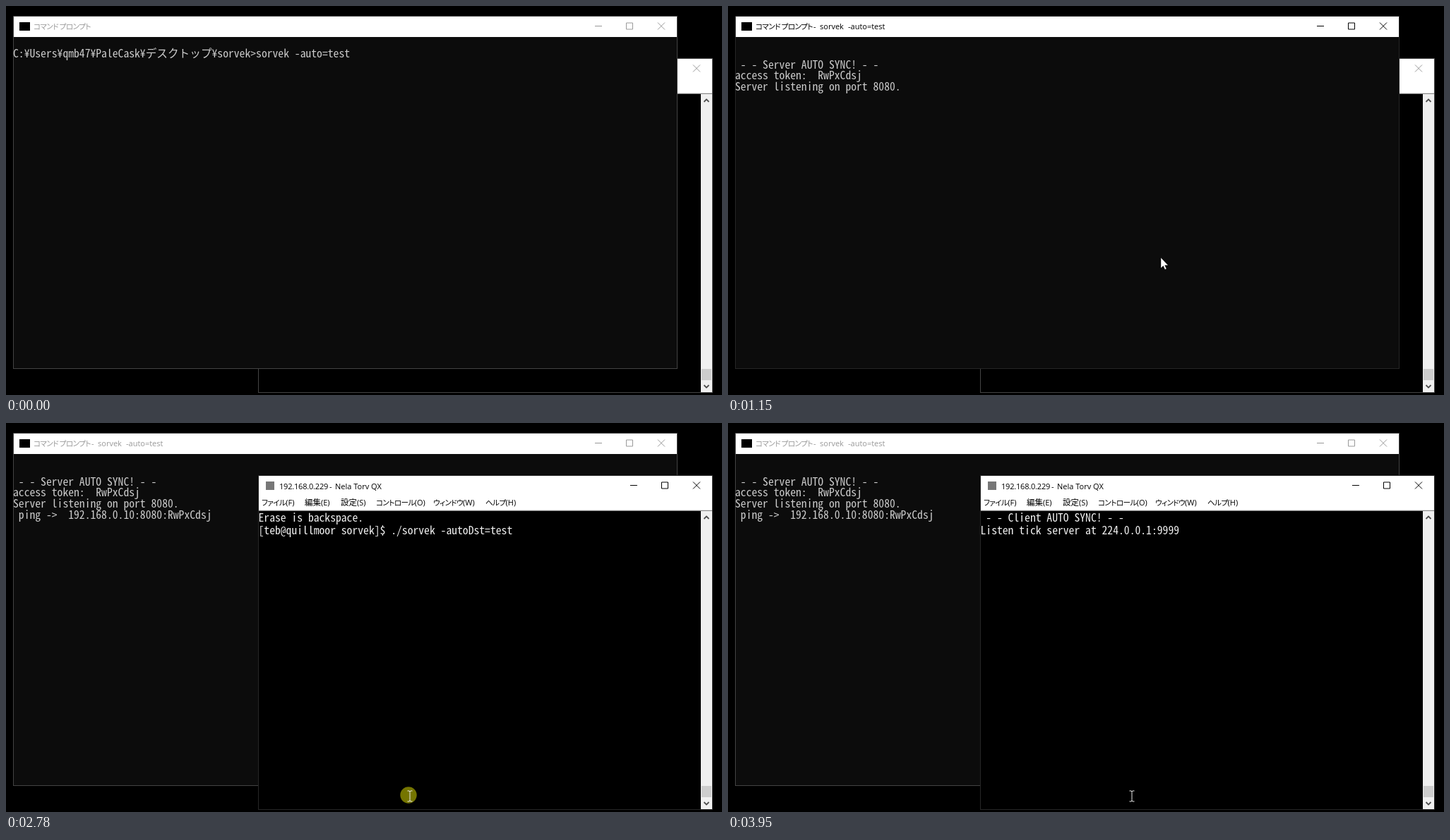
Animation of 1014 by 552 pixels, one loop 8 s. Source, as an HTML page:

```html
<!DOCTYPE html>
<html lang="ja">
<head>
<meta charset="utf-8">
<title>Terminal sync</title>
<style>
html, body { margin: 0; width: 100%; height: 100%; overflow: hidden; background: #000; }
svg { display: block; width: 1014px; height: 552px; }
text { white-space: pre; }
.term { font: 15.64px 'Noto Sans Mono CJK JP', 'Noto Sans CJK JP', 'Noto Sans Mono', monospace; font-kerning: none; }
.ui { font: 11px 'Open Sans', 'Noto Sans', 'Noto Sans CJK JP', sans-serif; }
.ip { letter-spacing: -.2px; }
.kana { font: 10.6px 'Noto Sans CJK JP', 'Noto Sans CJK', sans-serif; font-feature-settings: 'palt'; letter-spacing: -.6px; }
.kanji { font: 11.5px 'Noto Sans CJK JP', 'Noto Sans CJK', sans-serif; }
</style>
</head>
<body>
<svg id="stage" viewBox="0 0 1014 552" xmlns="http://www.w3.org/2000/svg"></svg>
<script>
const LOOP = 8000, CELL = 7.82;
const stage = document.getElementById('stage');

function el(parent, name, attrs = {}, text) {
  const node = document.createElementNS('http://www.w3.org/2000/svg', name);
  for (const key in attrs) node.setAttribute(key, attrs[key]);
  if (text) node.textContent = text;
  parent.appendChild(node);
  return node;
}

const rect = (parent, x, y, width, height, fill) =>
  el(parent, 'rect', { x, y, width, height, fill });

const show = (node, on) => node.setAttribute('visibility', on ? 'inherit' : 'hidden');

const label = (parent, x, y, text, cls = 'ui') =>
  el(parent, 'text', { x, y, class: cls }, text);

// Terminal text sits on a cell grid; Japanese characters take two cells.
function termLine(parent, x, y, text) {
  let col = 0;
  const xs = [...text].map(ch => {
    const at = x + col * CELL;
    col += ch > '\u3000' ? 2 : 1;
    return at.toFixed(2);
  });
  return el(parent, 'text', { x: xs.join(' '), y, class: 'term' }, text);
}

function makeWindow(x, y, w, h, headH, body) {
  const g = el(stage, 'g');
  rect(g, x, y, w, h, body);
  const border = el(g, 'rect', { x: x + .5, y: y + .5, width: w - 1, height: h - 1, fill: 'none' });
  rect(g, x + 1, y + 1, w - 2, headH, '#fff');
  const title = el(g, 'g');
  const right = x + w, mid = y + 14.5;
  el(g, 'path', {
    d: `M${right - 117} ${mid}h10M${right - 72.5} ${mid - 4.5}h9v9h-9z` +
       `M${right - 28} ${mid - 5}l10 10m0 -10l-10 10`,
    fill: 'none', class: 'buttons'
  });
  const buttons = g.lastChild;
  return {
    g, title,
    setActive(on) {
      title.setAttribute('fill', on ? '#000' : '#999');
      buttons.setAttribute('stroke', on ? '#000' : '#999');
      border.setAttribute('stroke', on ? '#262626' : '#444');
    }
  };
}

// Remote terminal
const remote = makeWindow(357, 74, 644, 475, 49, '#000');
rect(remote.g, 358, 123, 642, 1, '#e3e3e3');
rect(remote.g, 358, 124, 642, 1, '#8a8a8a');
rect(remote.g, 984, 125, 16, 423, '#f0f0f0');
rect(remote.g, 985, 515, 14, 16, '#cdcdcd');
el(remote.g, 'path', {
  d: 'M988.5 136l3.5 -3.5l3.5 3.5M988.5 538l3.5 3.5l3.5 -3.5',
  fill: 'none', stroke: '#505050', 'stroke-width': 1.8
});
rect(remote.g, 368, 83, 12, 12, '#777');
label(remote.title, 387, 94, '192.168.0.229', 'ui ip');
label(remote.title, 458, 94, '-');
label(remote.title, 466, 94, 'Nela Torv QX');
const menu = el(remote.g, 'g', { fill: '#000' });
[[362, 'ファイル', 'F'], [423, '編集', 'E'], [474, '設定', 'S'],
 [524, 'コントロール', 'O'], [605, 'ウィンドウ', 'W'], [679, 'ヘルプ', 'H']
].forEach(([x, word, key]) => {
  const item = label(menu, x, 117, '');
  el(item, 'tspan', { class: word > '一' ? 'kanji' : 'kana' }, word);
  el(item, 'tspan', {}, `(${key})`);
});

function remoteScreen(...lines) {
  const g = el(remote.g, 'g', { fill: '#f2f2f2' });
  lines.forEach((line, i) => termLine(g, 357.5, 140 + i * 18, line));
  return g;
}
const remotePrompt = remoteScreen('Erase is backspace.', '[teb@quillmoor sorvek]$ ./sorvek -autoDst=test');
const remoteSync = remoteScreen(' - - Client AUTO SYNC! - -', 'Listen tick server at 224.0.0.1:9999');
const caret = rect(remote.g, 717, 143, 8, 18, '#fff');

// Local console
const local = makeWindow(10, 14, 941, 501, 29, '#0c0c0c');
rect(local.g, 19, 23, 15, 12, '#000');
label(local.title, 39, 33, 'コマンド プロンプト', 'kana');
const titleTail = el(local.title, 'g');
label(titleTail, 121, 33, '-');
label(titleTail, 130, 33, 'sorvek');
label(titleTail, 170, 33, '-auto=test');

const localLine = (row, text) => termLine(localText, 10, 73 + row * 15.64, text);
const localText = el(local.g, 'g', { fill: '#ccc' });
const command = localLine(0, 'C:¥Users¥qmb47¥PaleCask¥デスクトップ¥sorvek>sorvek -auto=test');
const serverLines = [' - - Server AUTO SYNC! - -', 'access token:  RwPxCdsj', 'Server listening on port 8080.']
  .map((text, i) => localLine(i + 1, text));
const ping = localLine(4, ' ping ->  192.168.0.10:8080:RwPxCdsj');

// Pointer
const pointer = el(stage, 'g');
const halo = el(pointer, 'circle', { cx: -1.5, cy: -1.5, r: 11.7, fill: '#ff0', 'fill-opacity': .46 });
const arrow = el(pointer, 'path', {
  d: 'M0 0V15L3.4 11.8L5.8 17L8 16L5.7 10.9H10.3Z', fill: '#fff', stroke: '#000', 'stroke-width': .4
});
const beam = el(pointer, 'path', {
  d: 'M-3 -7.5h2.5l1 1l1 -1h2.5M.5 -6.5v13M-3 7.5h2.5l1 -1l1 1h2.5',
  fill: 'none', stroke: '#e8e8e8', 'stroke-width': 1
});

// Pointer stops: time, x, y
const stops = [
  [140, 592, 420], [218, 602, 390], [295, 609, 368], [373, 613, 357],
  [1770, 606, 406], [1850, 596, 461], [2000, 584, 496], [2080, 571.5, 529.5]
];

const within = (t, from, to) => t >= from && t < to;
let front = null;

function draw(t) {
  const remoteOn = t >= 2780;
  const top = remoteOn ? remote : local;
  if (top !== front) {
    stage.insertBefore(top.g, pointer);
    front = top;
  }
  local.setActive(within(t, 450, 2780));
  remote.setActive(remoteOn);

  const running = t >= 1150;
  show(command, !running);
  show(titleTail, running);
  serverLines.forEach(line => show(line, running));
  show(ping, t >= 1210);

  show(menu, remoteOn);
  show(remotePrompt, within(t, 2780, 3950));
  show(remoteSync, t >= 3950);
  show(caret, within(t, 2860, 3410));

  const stop = stops.filter(s => t >= s[0]).pop();
  show(pointer, stop);
  if (stop) pointer.setAttribute('transform', `translate(${stop[1]} ${stop[2]})`);
  show(arrow, t < 2080);
  show(beam, t >= 2080);
  show(halo, within(t, 450, 610) || within(t, 2780, 2860));
}

const start = performance.now();
function tick() {
  draw((performance.now() - start) % LOOP);
  requestAnimationFrame(tick);
}
tick();
</script>
</body>
</html>
```
